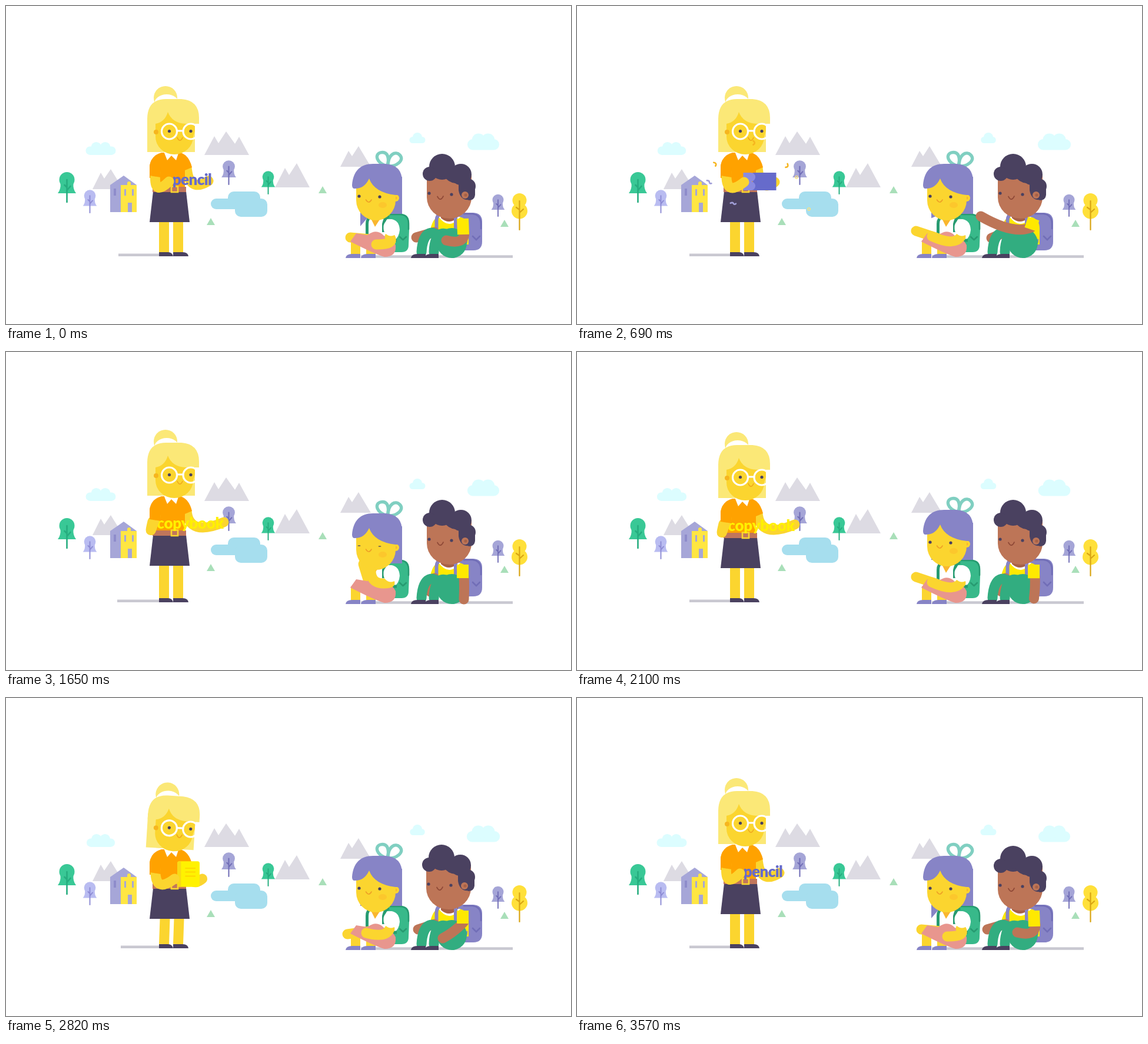
Animation of 960 by 540 pixels, one loop 3600 ms. Source, as an HTML page:

```html
<!DOCTYPE html>
<html lang="en">
<head>
<meta charset="utf-8">
<title>Classroom words</title>
<style>
html, body { margin: 0; width: 100%; height: 100%; overflow: hidden; background: #fff; }
svg { display: block; width: 960px; height: 540px; }
.line { fill: none; stroke-linecap: round; stroke-linejoin: round; }
.limb { fill: none; stroke-width: 17; stroke-linecap: round; stroke-linejoin: round; }
.skin { stroke: #fbd52f; }
.brown { stroke: #bd7557; }
text { font: 900 26px Lato, sans-serif; text-anchor: middle; }
</style>
</head>
<body>
<svg viewBox="0 0 960 540">
  <g id="scenery"></g>
  <g id="clouds" fill="#dcfdff"></g>
  <path d="M603 425.5H861" stroke="#c9c8d1" stroke-width="4.6"/>
  <path id="floor" stroke="#c9c8d1" stroke-width="4.6"/>

  <g id="teacher">
    <path id="tLegs" stroke="#fbd52f" stroke-width="17"/>
    <path d="M260 425V418H276Q283 419 284 425ZM284 425V418H300Q309 418 310 425Z" fill="#4a4160"/>
    <g id="tBody">
      <path id="tArmR" class="limb skin"/>
      <path d="M250 315H306L312 367H244Z" fill="#4a4160"/>
      <path d="M264 249H296Q311 253 316 274L304 279V309H250V292H244V272Q246 254 264 249Z" fill="#ffa200"/>
      <path d="M249 307H306V316H249Z" fill="#c1765b"/>
      <path d="M281 306.5H292V316H281Z" fill="none" stroke="#fbd52f" stroke-width="2.6"/>
      <path d="M268 247L274 262L281 254L289 262L294 247Z" fill="#fff"/>
      <g id="box">
        <path d="M-12-15H28V15H-12Z" fill="#666bcb"/>
        <path d="M-28-15H-16A7.5 7.5 0 0 1-14 0A7.5 7.5 0 0 1-16 15H-28Z" fill="#898be0"/>
      </g>
      <g id="book">
        <rect x="-27" y="-31" width="54" height="62" rx="5" fill="#fff200"/>
        <path d="M-22-31H-18V31H-22Q-27 31-27 26V-26Q-27-31-22-31Z" fill="#f8d916"/>
        <path d="M-7-14H16M-7-5H16M-7 5H16" class="line" stroke="#ffd400" stroke-width="2.6"/>
      </g>
      <text id="word"></text>
      <path id="tArmL" class="limb skin"/>
      <path d="M262 255Q244 258 244 274V288L263 291Z" fill="#ffa200"/>
      <g id="tHead">
        <circle cx="271" cy="156" r="20" fill="#fbe877"/>
        <ellipse cx="273" cy="166" rx="21" ry="16" fill="#fff"/>
        <path d="M240 190H321V248H240Z" fill="#fbe877"/>
        <path d="M254 172H321V212L318 222A32 30 0 0 1 254 222Z" fill="#fbd52f"/>
        <path d="M240 192Q240 158 272 158H298Q328 160 328 190V200H306Q282 199 275 180Q270 197 254 200H240Z" fill="#fbe877"/>
        <circle cx="255" cy="214" r="4" fill="#f6b51f"/>
        <path d="M291 223.5Q295.5 233 300 223.5" class="line" stroke="#f0a51c" stroke-width="1.6"/>
        <g class="line" stroke="#fff" stroke-width="3.2"><circle cx="277.5" cy="213" r="13"/><circle cx="314" cy="213" r="13"/><path d="M291 212H301"/></g>
        <g fill="#4a4160"><circle cx="277.5" cy="212.5" r="2.6"/><circle cx="314" cy="212.5" r="2.6"/></g>
      </g>
    </g>
  </g>
  <g id="confetti" class="line" stroke-width="2.6"></g>

  <g id="girl">
    <path d="M640 353H670Q685 353 685 368V380L684 406Q684 418 672 418H640Z" fill="#38b98a"/>
    <path d="M652 354H669Q684 354 684 370V379M654 398H662M669 392L674.5 397L680 392" class="line" stroke="#279b71" stroke-width="2.6"/>
    <path id="gLock" fill="#8784c6"/>
    <path d="M617 362H655Q668 364 669 380Q668 392 660 398H614Z" fill="#fff"/>
    <path d="M613.5 390V370Q613.5 360 621 357M641.5 384V370Q643 360 651 357M652 398H664" fill="none" stroke="#279b71" stroke-width="5"/>
    <path d="M620 361L627 375L636 361Z" fill="#f9b62f"/>
    <path d="M594 398V422M620 404V422" stroke="#fbd52f" stroke-width="16"/>
    <path d="M577 428Q578 421 588 421H602V428ZM603 428Q604 421 614 421H628V428Z" fill="#8784c6"/>
    <path id="gArmB" class="limb skin"/>
    <path d="M585 400L595 386L614 389Q630 377 642 390Q656 394 662 406Q664 426 643 426Q628 422 585 400Z" fill="#e8968e"/>
    <g id="gHead">
      <g class="line" stroke="#80cfc1" stroke-width="5.4"><path d="M648 272C629 267 626 252 636 249C648 246 652 257 648 272Z"/><path d="M649 272C649 251 662 246 669 253C678 262 663 273 649 272Z"/></g>
      <path d="M600 290H673V353H644L602 330Z" fill="#8784c6"/>
      <circle cx="662" cy="326" r="6" fill="#fbd52f"/>
      <circle cx="662" cy="326" r="2.5" fill="#f9b62f"/>
      <path d="M595 285H662V330A33.5 34 0 0 1 595 330Z" fill="#fbd52f"/>
      <path d="M588 304C590 280 602 268 624 268H645Q673 270 673 298V321H662Q626 317 617 293Q609 311 591 310Q588 309 588 304Z" fill="#8784c6"/>
      <ellipse cx="640" cy="338" rx="7" ry="5" fill="#fcc72c"/>
      <path d="M611.5 329Q616.5 337 621 329" class="line" stroke="#ee9f26" stroke-width="1.6"/>
      <g fill="#4a4160"><ellipse class="gEye" cx="600" cy="323" rx="2.6"/><ellipse class="gEye" cx="635" cy="324" rx="2.6"/></g>
    </g>
    <path id="gArmF" class="limb skin"/>
    <path d="M654 375V378" class="line" stroke="#fff" stroke-width="25"/>
  </g>

  <g id="boy">
    <g id="bBody">
      <path d="M766 351H794Q809 352 809 366V400Q809 415 794 415H766Z" fill="#8784c6"/>
      <path d="M778 353H792Q807 354 807 370V378M793 391L799 397L805 391" class="line" stroke="#716eb7" stroke-width="2.6"/>
      <path d="M734 358H771Q786 362 786 378V405H738L720 384Q724 362 734 358Z" fill="#ffe900"/>
      <path d="M735 358Q753 382 772 358Z" fill="#fff"/>
      <path d="M739 353H768V358Q754 373 739 360Z" fill="#a76147"/>
      <path d="M731.5 384V364Q732 355 739 352M764 354V376Q764 397 784 399" fill="none" stroke="#8784c6" stroke-width="6"/>
    </g>
    <path id="bArmB" class="limb brown"/>
    <g stroke="#32ad80"><path id="bLegB" class="limb"/><path id="bLegF" class="limb"/></g>
    <circle cx="757.5" cy="402.5" r="25.5" fill="#32ad80"/>
    <g fill="#4a4160"><path id="bShoeB" d="M-16 7Q-15 0-5 0H9V7Z"/><path id="bShoeF" d="M-16 7Q-15 0-5 0H8V7Z"/></g>
    <g id="bHead">
      <path d="M715 285H791V325A38 36 0 0 1 715 325Z" fill="#bd7557"/>
      <g fill="#4a4160"><circle cx="741" cy="273" r="22"/><circle cx="720" cy="285" r="12"/><circle cx="773" cy="286" r="18"/><circle cx="785" cy="306" r="13"/><path d="M718 277H788V329Q772 331 769 313V301Q752 302 745 289L718 294ZM780 310H797V321Q796 330 786 330Z"/></g>
      <circle cx="780" cy="321" r="6" fill="#bd7557"/>
      <circle cx="781" cy="321" r="2.6" fill="#a76147"/>
      <path id="bSmile" d="M733 323.5Q738 333 743 323" class="line" stroke="#8f4937" stroke-width="1.7"/>
      <ellipse id="bOh" cx="739" cy="325" rx="4" ry="4.5" fill="#934e3c"/>
      <g fill="#4a4160"><circle cx="719" cy="318" r="2.6"/><circle cx="757" cy="320" r="2.6"/></g>
    </g>
    <path id="bArmF" class="limb brown"/>
    <path id="bSleeve" stroke="#ffe900" stroke-width="20"/>
  </g>
</svg>

<script>
const $ = id => document.getElementById(id);
const set = (id, name, value) => $(id).setAttribute(name, value);
const move = (id, value) => set(id, 'transform', value);
const shape = (fill, d) => `<path fill="${fill}" d="${d}"/>`;

// Motion rules: a smooth step, a step on and off again, and a short bump.
const ramp = (t, start, length) => {
  const x = Math.max(0, Math.min(1, (t - start) / length));
  return x * x * (3 - 2 * x);
};
const pulse = (t, on, off, length = 150) => ramp(t, on, length) - ramp(t, off, length);
const bump = (t, peak, width = 45) => Math.exp(-(((t - peak) / width) ** 2));
const mix = (a, b, k) => a + (b - a) * k;
const mixAll = (a, b, k) => a.map((v, i) => mix(v, b[i], k));

// Start from the rest pose and lean toward each pose while its interval lasts.
const blend = (t, rest, moves) => moves.reduce((now, [pose, on, off]) => {
  const k = pulse(t, on, off);
  return now.map((v, i) => v + (pose[i] - rest[i]) * k);
}, rest);
const curve = (x, y, ...rest) => `M${x} ${y}${rest.length > 4 ? 'C' : 'Q'}${rest.join(' ')}`;

// Trees grow upward from the foot of the trunk.
const tree = (x, y, size, crown, trunk) => `<g transform="translate(${x} ${y}) scale(${size})">
  <g fill="${crown}"><circle cy="-38" r="13"/><path d="M-11-32Q-10-22-15.5-15H15.5Q10-22 11-32Z"/></g>
  <path class="line" stroke="${trunk}" stroke-width="2.6" d="M0 0V-38M0-20L6-27M0-25L-4-29"/></g>`;

$('scenery').innerHTML =
  shape('#dddbe3', 'M147 311L161 283L167 293L178 277L199 311ZM337 253L354 221L361 233L374 213L389 234L396 222L413 253ZM457 308L474 275L481 287L494 267L516 308ZM568 273L582 246L588 255L599 238L620 273Z') +
  shape('#a6a6d8', 'M177 304L200 288L222 304V350H177Z') +
  shape('#8e8ccb', 'M183 310H187V322H183Z') +
  shape('#ffe642', 'M195 304H206V301A3 3 0 0 1 212 301V304H222V350H195Z') +
  shape('#a6a6d8', 'M201 311H204V322H201ZM214 311H217V322H214ZM207 334H214V350H207Z') +
  tree(103.5, 333, 1, '#39c896', '#26ad7f') + tree(445.5, 319, .76, '#39c896', '#26ad7f') +
  tree(142.5, 351, .76, '#b9bcf1', '#8e8cd5') + tree(378.5, 303, .8, '#a5a5d7', '#716eb7') +
  tree(836, 357, .73, '#a5a5d7', '#716eb7') +
  '<g fill="#ffe03a"><circle cx="872.5" cy="330" r="12"/><circle cx="872.5" cy="348" r="13.5"/></g>' +
  '<path class="line" stroke="#d9a514" stroke-width="2.2" d="M872.5 380V331M872.5 351L879 345M872.5 346L867 342"/>' +
  shape('#a9dfb9', [[348, 360], [538, 306], [847, 363]].map(([x, y]) => `M${x} ${y}l7 12h-14Z`).join('')) +
  '<g fill="#a6deee"><rect x="348" y="327" width="70" height="18" rx="9"/><rect x="377" y="315" width="55" height="29" rx="10"/><rect x="389" y="327" width="55" height="31" rx="10"/></g>';

const cloud = (cx, bottom, width, height) => {
  const r = height * .33, x = cx - width / 2;
  return `<rect x="${x}" y="${bottom - 2 * r}" width="${width}" height="${2 * r}" rx="${r}"/>` +
    [.35, .65].map(p => `<circle cx="${x + width * p}" cy="${bottom - height * .6}" r="${height * .4}"/>`).join('');
};

function drawClouds(t) {
  const wide = .97 + .03 * Math.cos(t * Math.PI / 900);
  $('clouds').innerHTML = cloud(161, 253, 51 * wide, 22) + cloud(811, 244.5, 54 + (1 - wide) * 40, 28) +
    `<rect x="${699 - 13.5 * wide}" y="222" width="${27 * wide}" height="11" rx="5.5"/><circle cx="699" cy="223" r="8"/>`;
}

const bits = [
  '<path stroke="#f6b51f" d="M-2-3Q4-2 1 3"/>',
  '<circle stroke="#ffe278" stroke-width="1.3" r="2.2"/>',
  '<path stroke="#a19fd8" d="M-4 1Q-1-2 1 0T5-1"/>'
];

// Seven pieces fly out to a loose oval, then shrink away.
function drawConfetti(t) {
  const age = t % 1800 - 540, out = 1 - (1 - Math.max(0, Math.min(1, age / 150))) ** 3;
  const size = age < 0 ? 0 : 1 - ramp(age, 180, 330), seed = t < 1800 ? 3.7 : 0;
  $('confetti').innerHTML = Array.from({ length: 7 }, (_, i) => {
    const angle = seed + i * 2.4, reach = out * (.85 + .25 * Math.sin(i * 5));
    return `<g transform="translate(${310 + 105 * reach * Math.cos(angle)} ${298 + 65 * reach * Math.sin(angle)}) rotate(${i * 9}) scale(${size})">${bits[i % 3]}</g>`;
  }).join('');
}

const words = [
  { text: 'pencil', fill: '#666bcb', x: 316, gap: -.6, hands: [277, 298, 344, 297] },
  { text: 'copybook', fill: '#fff000', x: 313, gap: -.3, hands: [249, 292, 370, 293] }
];

// Each 1800 ms beat: word, hop, object, crouch, hop, next word.
function drawTeacher(t) {
  const beat = t % 1800, word = words[t > 900 && t < 2700 ? 1 : 0];
  const dy = 8 * pulse(beat, 900, 1320, 120) + 6 * bump(beat, 455) - 10 * bump(beat, 550) -
    8 * bump(beat, 1455) - 4 * pulse(beat, 1400, 1660, 100);
  const tilt = 3.5 * pulse(beat, 900, 1370, 100);
  const size = 1 - pulse(beat, 410, 1280, 130) + .08 * bump(beat, 1455);
  const spread = 1 - pulse(beat, 400, 1300);
  const item = ramp(beat, 480, 80) - ramp(beat, 920, 280) + .12 * bump(beat, 565);
  const squeeze = 8 * (1 - item);
  const [lx, ly, rx, ry] = mixAll([284 + squeeze, 299, 336 - squeeze, 299], word.hands, 1 - pulse(beat, 410, 1290, 130));

  set('floor', 'd', `M${191 + dy * .5} 422.7H262`);
  set('tLegs', 'd', [268.5, 292.5].map(x => `M${x + tilt * .5} ${360 + dy}L${x} 418`).join(''));
  move('tBody', `translate(0 ${dy})`);
  move('tHead', `rotate(${tilt} 281 210)`);
  set('tArmL', 'd', curve(254, 283, mix(250, lx - 28, .3), 325, lx, ly));
  set('tArmR', 'd', curve(307, 274, 311, 318, rx, ry));
  move('box', `translate(310.5 298) scale(${t < 1800 ? item : 0})`);
  move('book', `translate(310 291) scale(${t < 1800 ? 0 : item})`);
  $('word').textContent = word.text;
  $('word').style.letterSpacing = word.gap - 4 * (1 - spread) + 'px';
  set('word', 'fill', word.fill);
  move('word', `translate(${word.x - 5 * (1 - spread)} 304) scale(${size})`);
}

// Elbow, front hand, back hand, then head offset and tilt.
const girl = {
  rest: [662, 405, 629, 405, 585, 393, 0, 0, 0],
  clap: [640, 408, 603, 391, 576, 382, 0, 0, 0],
  shy: [620, 398, 620, 371, 607, 360, 0, 6, 0],
  cheer: [624, 402, 594, 365, 579, 375, 3, 0, 4],
  fold: [645, 408, 612, 399, 580, 401, 0, 0, 0]
};

function drawGirl(t) {
  const [ex, ey, fx, fy, bx, by, x, y, tilt] = blend(t, girl.rest, [
    [girl.clap, 390, 1380], [girl.shy, 1380, 1930], [girl.clap, 1930, 2240], [girl.cheer, 2240, 2650], [girl.fold, 2650, 3250]]);
  const lock = 374 - 21 * (ramp(t, 450, 400) - ramp(t, 3080, 300)), eye = 2.6 - 1.9 * pulse(t, 1400, 1900);
  move('gHead', `translate(${x} ${y}) rotate(${tilt} 630 350)`);
  document.querySelectorAll('.gEye').forEach(el => el.setAttribute('ry', eye));
  set('gLock', 'd', `M602 340V${lock}L620 353V340Z`);
  set('gArmF', 'd', curve(652, 392, ex, ey, fx, fy));
  set('gArmB', 'd', `M618 396L${bx} ${by}`);
}

// Shoulder, elbow, front hand, back hand, then head offset.
const boy = {
  rest: [779, 385, 778, 406, 748, 398, 697, 393, 0, 0],
  reach: [772, 376, 742, 389, 686, 357, 704, 394, 0, 0],
  hug: [778, 380, 764, 396, 742, 408, 700, 393, -1, -2],
  prop: [778, 381, 779, 398, 778, 420, 721, 407, 0, 0],
  rock: [787, 376, 750, 360, 700, 361, 700, 362, 22, -3]
};
const legs = {
  B: [[738, 396, 728, 378, 708, 380, 706, 418], [752, 384, 742, 366, 728, 366, 704, 383]],
  F: [[760, 398, 748, 380, 728, 380, 727, 418], [757, 398, 745, 374, 724, 362, 711, 400]]
};

function drawBoy(t) {
  const [sx, sy, ex, ey, fx, fy, bx, by, x, y] = blend(t, boy.rest, [
    [boy.reach, 390, 810], [boy.hug, 810, 1300], [boy.prop, 1300, 2080], [boy.rock, 2230, 2550], [boy.hug, 2550, 3250]]);
  const lean = pulse(t, 2230, 2550);
  move('bBody', `translate(${7 * lean} ${-2 * lean}) rotate(${7 * lean} 750 440)`);
  move('bHead', `translate(${x} ${y}) rotate(${9 * lean} 745 330)`);
  set('bSmile', 'opacity', lean > .5 ? 0 : 1);
  set('bOh', 'opacity', lean > .5 ? 1 : 0);
  set('bArmF', 'd', curve(sx, sy, ex, ey, fx, fy));
  set('bArmB', 'd', `M${728 + 10 * lean} ${384 - 20 * lean}L${bx} ${by}`);
  set('bSleeve', 'd', `M${776 + 10 * lean} 361L${sx - 2} ${sy + 3}`);
  for (const side in legs) set('bLeg' + side, 'd', curve(...mixAll(...legs[side], lean)));
  move('bShoeB', `translate(${704 - 7 * lean} ${421 - 38 * lean}) rotate(${80 * lean})`);
  move('bShoeF', `translate(${727 - 19 * lean} ${421 - 16 * lean}) rotate(${5 * lean})`);
}

const start = performance.now();
function draw() {
  const t = (performance.now() - start) % 3600;
  for (const part of [drawClouds, drawTeacher, drawConfetti, drawGirl, drawBoy]) part(t);
  requestAnimationFrame(draw);
}
draw();
</script>
</body>
</html>
```
